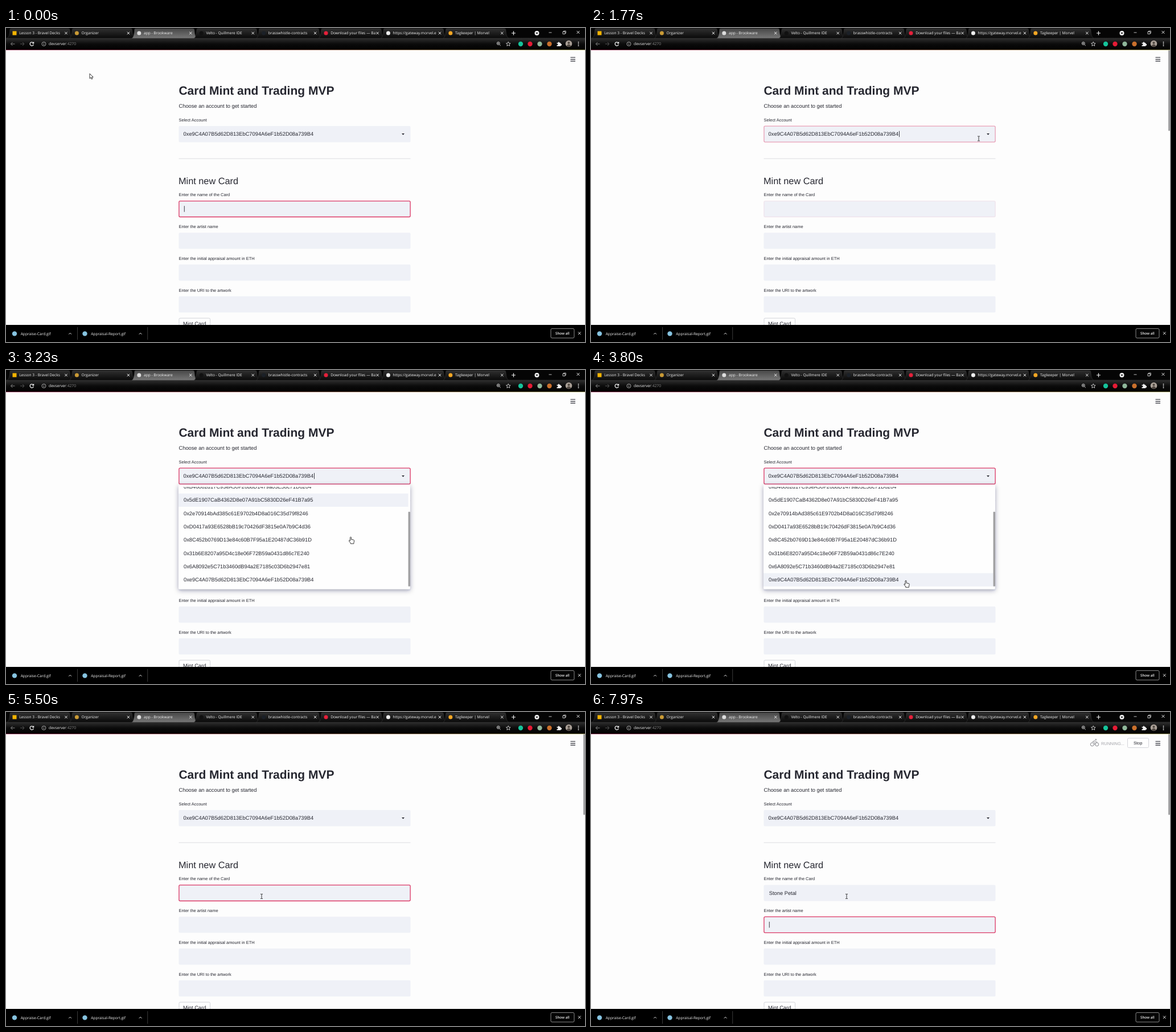
An HTML page for the animation above (8 s loop, 1017x551 px).

```html
<!DOCTYPE html>
<html lang="en">
<head>
<meta charset="utf-8">
<title>Card minting</title>
<style>
html, body { margin: 0; width: 100%; height: 100%; overflow: hidden; background: #fdfdfd; }
svg { display: block; width: 1017px; height: 551px; }
text { font: 9.31px "Liberation Sans", Arial, sans-serif; fill: #262730; white-space: pre; text-rendering: geometricPrecision; }
.ui text { font-family: "Open Sans", "Noto Sans", sans-serif; font-size: 6.6px; fill: #f4f4f4; }
.line { fill: none; stroke: #eee; stroke-width: 1; }
</style>
</head>
<body>
<svg id="stage" viewBox="0 0 1017 551">
  <defs>
    <linearGradient id="tab" x2="0" y2="1"><stop stop-color="#303030"/><stop offset="1" stop-color="#090909"/></linearGradient>
    <linearGradient id="active" x2="0" y2="1"><stop stop-color="#484848"/><stop offset="1" stop-color="#777"/></linearGradient>
    <linearGradient id="bar" x2="0" y2="1"><stop stop-color="#303030"/><stop offset=".5" stop-color="#0c0c0c"/><stop offset="1" stop-color="#000"/></linearGradient>
    <linearGradient id="ribbon"><stop stop-color="#8a3050"/><stop offset="1" stop-color="#a8a468"/></linearGradient>
    <filter id="shadow" x="-10%" y="-10%" width="120%" height="125%"><feDropShadow dx="0" dy="2.5" stdDeviation="4" flood-color="#20203a" flood-opacity=".36"/></filter>
    <clipPath id="listClip"><rect x="303" y="205" width="407" height="175"/></clipPath>
  </defs>
  <rect width="1017" height="551" fill="#fdfdfd"/>
  <g id="page"></g>
  <g id="status">
    <g class="line" style="stroke:#85868c">
      <circle cx="880.3" cy="56.8" r="3"/><circle cx="888.7" cy="56.8" r="3"/>
      <path d="M880.5 52.5l4-2.2 1.8 2.4h3M882.5 52.5l2.5 2v3.2"/><circle cx="886.7" cy="48.6" r="1"/>
    </g>
    <text x="896" y="57.7" style="font-size:7.45px;fill:#a3a4aa">RUNNING...</text>
    <rect x="942.5" y="46" width="37" height="16.5" rx="2" fill="#fff" stroke="#d3d4d9"/>
    <text x="953" y="56.8" style="font-size:7.45px">Stop</text>
  </g>
  <path class="line" style="stroke:#262730;stroke-width:1.2" d="M991.5 51.5h8.5m-8.5 3.3h8.5m-8.5 3.3h8.5"/>
  <rect id="pageBar" x="1014" y="39" width="3" height="141.5" rx="1" fill="#a2a2a4"/>
  <g id="menu">
    <rect x="303" y="201" width="407" height="183.5" rx="2" fill="#fefefe" filter="url(#shadow)"/>
    <g clip-path="url(#listClip)"><g id="list"></g></g>
    <rect id="listBar" x="706.5" y="205" width="3.5" height="131" rx="1" fill="#a2a2a4"/>
  </g>
  <g id="chrome" class="ui"></g>
  <g id="pointers">
    <path fill="#fff" stroke="#222" stroke-width=".9" d="M0 0v8.6l2-1.8 1.4 3 1.5-.7-1.4-2.9h2.7z"/>
    <path class="line" style="stroke:#222;stroke-width:.9" d="M-2-4h1.4L0-3.5.6-4H2M0-3.5v7M-2 4h1.4L0 3.5.6 4H2"/>
    <path fill="#fff" stroke="#222" stroke-width=".9" stroke-linejoin="round" d="M-1-.4Q0-1.8 1-.4V3.3L5 4.1Q6.3 4.4 6.1 5.8L5.4 9.3V10.8H-.3V9.5L-3 6.2Q-3.4 4.8-2 4.9L-1 5.8z"/>
  </g>
</svg>
<script>
const $ = id => document.getElementById(id);
const text = (x, y, s, size, more = "") =>
  `<text x="${x}" y="${y}" style="${size ? `font-size:${size}px;` : ""}${more}">${s}</text>`;
const rect = (x, y, w, h, fill, more = "") => `<rect x="${x}" y="${y}" width="${w}" height="${h}" fill="${fill}" ${more}/>`;
const dot = (x, y, r, fill) => `<circle cx="${x}" cy="${y}" r="${r}" fill="${fill}"/>`;
const line = (d, more = "") => `<path class="line" d="${d}" style="${more}"/>`;
const cross = (x, y, r = 2.2) => line(`M${x - r} ${y - r}l${2 * r} ${2 * r}m0 ${-2 * r}l${-2 * r} ${2 * r}`);

const accounts = [
  "7B21d96e4Ca0358b17E62d904ca83B5617290d46", "a3905E7D41b68c2209F4e7a81B560d3c94E17208",
  "B46082d17C93eA50F26b8D1479a03E58c71D6204", "5dE1907CaB4362D8e07A91bC5830D26eF41B7a95",
  "2e70914bAd385c61E9702b4D8a016C35d79f8246", "D0417a93E6528bB19c70426dF3815e0A7b9C4d36",
  "8C452b0769D13e84c60B7F95a1E20487dC36b91D", "31b6E8207a95D4c18e06F72B59a0431d86c7E240",
  "6A8092e5C71b3460dB94a2E7185c03D6b2947e81", "e9C4A07B5d62D813EbC7094A6eF1b52D08a739B4"
].map(s => "0x" + s);
const labels = ["Enter the name of the Card", "Enter the artist name",
  "Enter the initial appraisal amount in ETH", "Enter the URI to the artwork"];
const fieldTops = [172, ...labels.map((_, i) => 303.4 + i * 55.8)];
const rowHeight = 23.3, maxScroll = 58.2;

function buildPage() {
  const ring = (id, y) => rect(303.9, y + .2, 406.2, 27.9, "none", `id="${id}" rx="2" stroke="#dc3765" stroke-width="1.3"`);
  $("page").innerHTML =
    text(303.4, 117, "Card Mint and Trading MVP", 21, "font-weight:bold") +
    text(303.5, 140.3, "Choose an account to get started") +
    text(303.5, 163.7, "Select Account", 7.45) +
    fieldTops.map(y => rect(303.5, y, 407, 28.4, "#eff1f7", 'rx="2"')).join("") +
    text(311.6, 189.2, accounts[9]) +
    '<path d="M695 185h5l-2.5 2.7z" fill="#262730"/>' +
    rect(303.5, 228.7, 407, 1, "#dcdde1") +
    text(303, 273.8, "Mint new Card", 16.3) +
    labels.map((s, i) => text(303.5, 295.2 + i * 55.8, s, 7.45)).join("") +
    rect(304, 509.2, 54.5, 22, "#fff", 'rx="2" stroke="#d3d4d9"') +
    text(311, 521.8, "Mint Card") +
    '<text id="typed" x="312.8" y="320.6"></text>' +
    '<text id="hint" x="706" y="328.4" text-anchor="end" style="font-size:6.98px;fill:#85868c">Press Enter to apply</text>' +
    ring("selectRing", fieldTops[0]) + ring("nameRing", fieldTops[1]) + ring("artistRing", fieldTops[2]) +
    rect(0, 0, .9, 10.5, "#262730", 'id="caret"');
  $("list").innerHTML = accounts.map((s, i) =>
    rect(303, 205 + i * rowHeight, 403.5, rowHeight, "#eff1f7", 'class="row"') +
    text(312, 219.8 + i * rowHeight, s)).join("");
}

function buildChrome() {
  const tabs = [["Lesson 3 - Bravel Decks", "#f4b400"], ["Organizer", "#c99a35"], ["app - Brookware", "#ddd"],
    ["Velto - Quillmere IDE", "#111"], ["brasswhistle-contracts", "#1b2027"], ["Download your files — Ba", "#e5203a"],
    ["https://gateway.morvel.e", "#eee"], ["Tagkeeper | Morvel", "#f5a623"]];
  let out = rect(0, 0, 1017, 18, "#050505") + rect(0, 17.5, 1017, 20.5, "url(#bar)");
  tabs.forEach(([name, color], i) => {
    const x = 5 + i * 109.4, on = i == 2;
    out += `<path d="M${x - 3} 18Q${x + 1} 17 ${x + 2} 2Q${x + 2} 1 ${x + 5} 1H${x + 104}Q${x + 107} 1 ${x + 107} 3Q${x + 108} 17 ${x + 112} 18z" fill="url(#${on ? "active" : "tab"})" stroke="#3a3a3a" stroke-width=".5"/>` +
      (i ? dot(x + 10, 9, 3.5, color) : rect(11.5, 5.5, 7, 7, color)) +
      text(x + 18.2, 11.3, name) + cross(x + 100.5, 9);
  });
  out += line("M888 9h7m-3.5-3.5v7", "stroke-width:1.2") + dot(932.5, 9, 4, "#eee") +
    '<path d="M930.3 8h4.4l-2.2 2.7z" fill="#111"/>' +
    line("M953.5 8h5M978 6.5h4v4h-4zM979.5 6.5v-1.3h3.8v4h-1.3", "stroke-width:.8") + cross(1005, 7.5, 2.4);
  // Toolbar
  out += line("M15.5 28h-7m3-3l-3 3 3 3", "stroke:#888") + line("M25 28h7m-3-3l3 3-3 3", "stroke:#555") +
    line("M48 26.2a3.2 3.2 0 1 0 .4 2.8M48.6 24.5v2.4h-2.4", "stroke-width:1.3") +
    line("M70 28a3.5 3.5 0 1 0-7 0a3.5 3.5 0 1 0 7 0M66.5 27.5v2.5m0-4.2v.8", "stroke:#ccc;stroke-width:.8") +
    '<text x="75" y="30.2" style="font-size:6.75px">devserver<tspan fill="#888">:4270</tspan></text>' +
    line("M867.3 27a2.5 2.5 0 1 0-5 0a2.5 2.5 0 1 0 5 0M866.7 29l2.2 2.2M863.5 27h2.6M864.8 25.7v2.6", "stroke-width:.8") +
    line("M882.3 24.2l1.1 2.5 2.7.2-2 1.8.6 2.7-2.4-1.4-2.4 1.4.6-2.7-2-1.8 2.7-.2z", "stroke-width:.8") +
    dot(904, 28, 4.2, "#15c39a") + dot(920.5, 28, 4.2, "#e51b35") + dot(937.5, 28, 4.2, "#8fb79a") +
    dot(954.5, 28, 4.2, "#c9702c") +
    '<path d="M967.5 26h2a1.4 1.4 0 1 1 2.8 0h2v2a1.4 1.4 0 1 1 0 2.6v1.4h-6.8v-2a1.4 1.4 0 1 0 0-2.6z" fill="#eee"/>' +
    dot(988.5, 27.5, 5.8, "#aaa097") + dot(988.5, 26, 2, "#514942") +
    '<path d="M984.5 31.5q4-6 8 0q-4 3-8 0z" fill="#514942"/>' +
    [25, 28, 31].map(y => dot(1005.5, y, .9, "#eee")).join("") +
    rect(0, 38, 1017, 1, "url(#ribbon)");
  // Download shelf
  out += rect(0, 521, 1017, 30, "#000");
  [["Appraise-Card.gif", 0, 125.5], ["Appraisal-Report.gif", 123.5, 248.7]].forEach(([name, x, edge]) => {
    out += dot(x + 15, 536.4, 4.2, "#86c3e0") +
      text(x + 25.7, 538.8, name) + line(`M${x + 110.3} 537.5l2.3-2.3 2.3 2.3`) + rect(edge - .5, 525, 1, 22, "#3a3a3a");
  });
  out += rect(957, 527.5, 41, 16.5, "#050505", 'rx="2" stroke="#999" stroke-width=".9"') +
    text(965, 538, "Show all", 6.2, "font-weight:600") + cross(1007.3, 535.7, 2.3);
  $("chrome").innerHTML = out;
}

buildPage();
buildChrome();

const ramp = (t, start, span) => Math.min(1, Math.max(0, (t - start) / span));
const ease = k => k * k * (3 - 2 * k);
const between = (t, a, b) => t >= a && t < b;
const show = (id, k) => $(id).setAttribute("opacity", +k);

const route = [[0, 147, 80], [250, 147, 80], [1500, 681, 194], [1800, 681, 194], [2440, 605, 297],
  [2560, 604.5, 299.3], [2760, 605.5, 294], [3260, 605.5, 294], [3740, 553, 370.5], [4020, 553, 370.5],
  [4750, 449, 323.5], [8000, 449, 323.5]];
const selectClick = 1700, menuOpen = 1870, menuClose = 3960, nameClick = 4950, tabKey = 7600;
const word = "Stone Petal";
const keyTimes = [5870, 6040, 6200, 6370, 6500, 6670, 6840, 7040, 7130, 7250, 7370];

function mouse(t) {
  const i = route.findIndex(p => p[0] > t);
  const [t0, x0, y0] = route[i - 1], [t1, x1, y1] = route[i];
  const k = ease((t - t0) / (t1 - t0));
  return [x0 + (x1 - x0) * k, y0 + (y1 - y0) * k];
}
const scroll = t => maxScroll * ease(ramp(t, 2900, 220));

// The hovered row stays the same while the list scrolls under a resting pointer.
function hoverRow(t) {
  if (t < menuOpen) return -1;
  if (between(t, 2850, 3270)) t = 2850;
  const y = mouse(t)[1];
  return y < 205 ? -1 : Math.floor((y - 205 + scroll(t)) / rowHeight);
}

function drawMenu(t) {
  const open = between(t, menuOpen, menuClose);
  show("menu", open ? ramp(t, menuOpen, 100) : 0);
  if (!open) return;
  const offset = scroll(t), weights = Array(10).fill(0);
  for (let i = 0; i < 10; i++) {
    const row = hoverRow(t - i * 20);
    if (row >= 0) weights[row] += .1;
  }
  document.querySelectorAll(".row").forEach((el, i) => el.setAttribute("opacity", weights[i]));
  $("list").setAttribute("transform", `translate(0 ${-offset})`);
  $("listBar").setAttribute("y", 205 + offset * 175 / 233);
}

function drawCaret(t, count) {
  const typedWidth = count ? $("typed").getComputedTextLength() : 0;
  const [x, y, since] = t < 1670 ? [312.8, 312.2, -100]
    : t < nameClick ? [541, 180.7, selectClick]
    : t < tabKey ? [312.8 + typedWidth, 312.2, count ? keyTimes[count - 1] : nameClick]
    : [312.8, 368, tabKey];
  $("caret").setAttribute("x", x);
  $("caret").setAttribute("y", y);
  show("caret", t >= since && Math.floor((t - since) / 530) % 2 == 0);
}

function drawPointer(t) {
  const [x, y] = mouse(t);
  const inField = between(x, 303.5, 710.5) && fieldTops.some(top => between(y, top, top + 28.4));
  const shape = between(t, menuOpen, menuClose) && y > 201 ? 2 : inField ? 1 : 0;
  $("pointers").setAttribute("transform", `translate(${x} ${y})`);
  [...$("pointers").children].forEach((el, i) => el.setAttribute("opacity", +(i == shape)));
}

function frame(now) {
  const t = now % 8000;
  const count = keyTimes.filter(k => k <= t).length;
  $("typed").textContent = word.slice(0, count);
  show("hint", count && t < tabKey);
  show("selectRing", ramp(t, 1690, 180) - ramp(t, nameClick, 150));
  show("nameRing", 1 - ramp(t, 1670, 110) + ramp(t, nameClick, 150) - ramp(t, tabKey, 150));
  show("artistRing", ramp(t, tabKey, 150));
  show("pageBar", between(t, 60, menuOpen + 80) || t >= menuClose);
  show("status", ramp(t, 7720, 180));
  drawMenu(t);
  drawCaret(t, count);
  drawPointer(t);
  requestAnimationFrame(frame);
}
requestAnimationFrame(frame);
</script>
</body>
</html>
```
